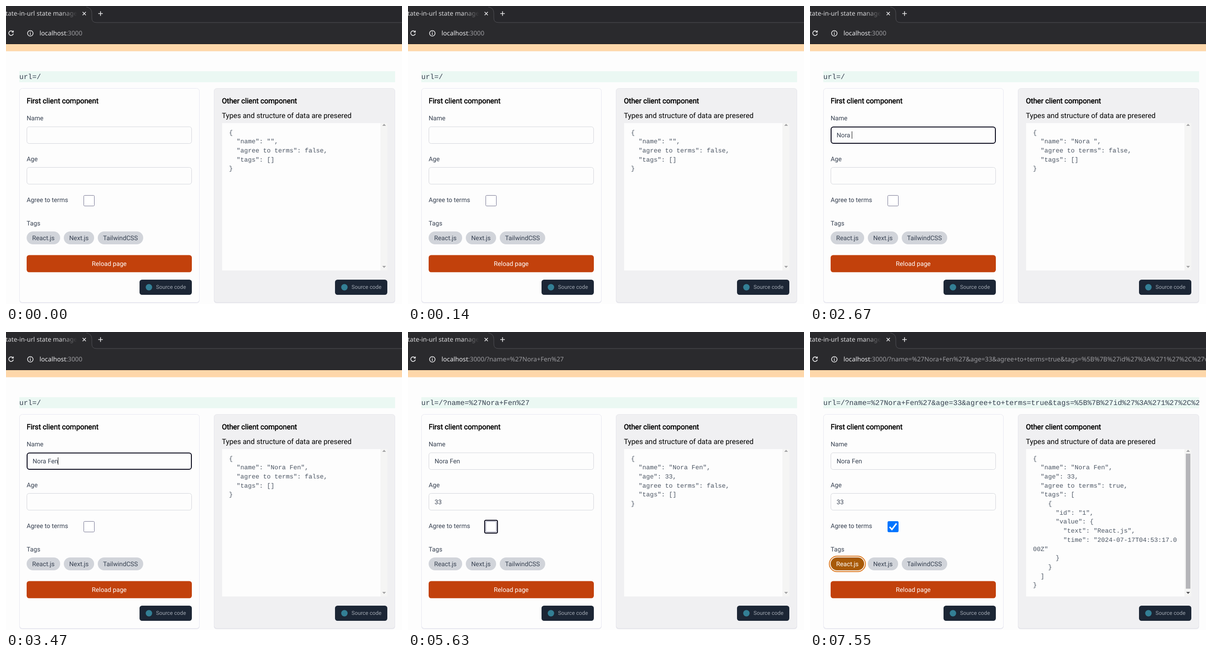
An HTML page for the animation above (8000 ms loop, 863 by 649 pixels).

```html
<!DOCTYPE html>
<html lang="en">
<head>
<meta charset="utf-8">
<style>
  html, body { margin: 0; width: 100%; height: 100%; overflow: hidden; background: #fdfdfd; }
  svg { display: block; width: 863px; height: 649px; }
  text { white-space: pre; font: 13.75px Roboto, sans-serif; fill: #374151; text-rendering: geometricPrecision; }
  .ui { font-family: "Noto Sans", sans-serif; fill: #9b9b9f; }
  .title { font-size: 15.72px; fill: #000; }
  .bold { stroke: #000; stroke-width: .55px; }
  .mono { font-family: "Liberation Mono", monospace; fill: #4b5563; }
  .url { font-size: 15.72px; fill: #374151; }
  .small { font-size: 11.79px; fill: #a0a7b1; }
  .mid { text-anchor: middle; }
  .icon { fill: none; stroke: #e6e6e8; stroke-width: 1.6; }
</style>
</head>
<body>
<svg viewBox="0 0 863 649">
  <defs>
    <linearGradient id="fade" gradientUnits="userSpaceOnUse" x1="120" x2="155">
      <stop stop-color="#d8d8da"/>
      <stop offset="1" stop-color="#d8d8da" stop-opacity="0"/>
    </linearGradient>
    <clipPath id="urlClip"><rect x="29" y="142" width="819" height="24"/></clipPath>
  </defs>

  <rect width="863" height="649" fill="#fdfdfd"/>
  <rect y="83" width="863" height="15.5" fill="#fed7aa"/>
  <rect x="29" y="142" width="819" height="24" fill="#ebf8f3"/>
  <text id="pageUrl" class="mono url" x="29" y="159" clip-path="url(#urlClip)"></text>

  <rect x="29" y="180" width="393" height="467" rx="6" fill="#e6e6ee"/>
  <rect x="29.5" y="179.5" width="392" height="466" rx="6" fill="#fdfdfd" stroke="#e8e8f1"/>
  <rect x="453" y="180" width="395" height="467" rx="6" fill="#e2e2e8"/>
  <rect x="453.5" y="179.5" width="394" height="466" rx="6" fill="#f0f0f2" stroke="#e6e6ec"/>

  <text class="title bold" x="45" y="212">First client component</text>
  <text class="title bold" x="470.5" y="212">Other client component</text>
  <text class="title" x="470.5" y="244">Types and structure of data are presered</text>

  <text x="45" y="249">Name</text>
  <text x="45" y="338">Age</text>
  <text x="45" y="427">Agree to terms</text>
  <text x="45" y="478">Tags</text>

  <rect id="nameBox" rx="5"/>
  <rect id="ageBox" rx="5"/>
  <text id="name" x="58" y="286"></text>
  <text id="age" x="58" y="375"></text>
  <rect id="caret" width="1" height="16" fill="#111"/>
  <g id="spinner">
    <rect x="378" y="360" width="14" height="20" fill="#efeff3"/>
    <path d="M381 368l4-4 4 4zM381 373h8l-4 4z" fill="#444450"/>
  </g>

  <rect id="check" x="169.5" y="412.5" width="23" height="23" rx="2"/>
  <path id="tick" d="M173.500 424.500l5 5.500 10-13" fill="none" stroke="#fff" stroke-width="3.200"/>
  <rect id="checkRing" x="167" y="410" width="28" height="28" rx="3" fill="none" stroke="#0a0a1c" stroke-width="2"/>

  <g id="tags"></g>

  <rect x="45" y="542.500" width="360" height="37.300" rx="5.500" fill="#c2410c"/>
  <text class="mid" x="225" y="566" style="fill:#fff">Reload page</text>
  <g id="sources"></g>

  <rect x="471" y="255" width="345" height="321" fill="#fdfdfd"/>
  <rect x="816" y="255" width="15" height="321" fill="#f5f5f4"/>
  <rect id="thumb" x="819" y="265" width="10" height="294" fill="#b5b5b9"/>
  <path d="M820 261l4-4.500 4 4.500z" fill="#a3a3a5"/>
  <path id="downArrow" d="M820 566h8l-4 4.500z"/>
  <g id="code"></g>

  <rect id="highlight" y="83" width="863" height="566" fill="rgb(111,168,220)" fill-opacity=".66"/>

  <rect width="863" height="83" fill="#2a2a2d"/>
  <path d="M172 0Q187 3 187 15V26Q187 36 197 36H863V0z" fill="#27272b"/>
  <path d="M175 2Q187 4 187 15V26Q187 36 197 36H863" fill="none" stroke="#515156"/>
  <rect y="82" width="863" height="1" fill="#18181a"/>
  <text class="ui" x="-7.500" y="21" style="fill:url(#fade)">state-in-url state manage</text>
  <path class="icon" d="M167 13l7 7m0-7l-7 7M201 16.500h10m-5-5v10"/>
  <path class="icon" d="M15 56A5 5 0 1 0 16 60M16 53.500V57H12.500"/>
  <circle class="icon" cx="53" cy="59.500" r="6"/>
  <path class="icon" d="M53 58.500v4.500M53 55.800v1.500"/>
  <text class="ui" x="73" y="64"><tspan fill="#ededef">localhost</tspan><tspan id="barUrl"></tspan></text>
</svg>

<script>
const LOOP = 8000;
const BLINK = 610;
const FULL_NAME = "Nora Fen";
const NAME_KEYS = [1730, 1920, 2160, 2530, 2670, 3090, 3380, 3470];
const AGE_KEYS = [5300, 5440];
const AT = {
  nameFocus: 840, ageFocus: 3750, ageCaret: 3800, nameUrl: 3850,
  checkFocus: 5630, ageUrl: 5770, hover: 6190, checked: 6610, checkUrl: 6800,
  tagged: 7310, tagUrl: 7500
};
const TAG = { id: "1", value: { text: "React.js", time: "2024-07-17T04:53:17.000Z" } };
const TAG_FILL = "#d1d4da";

const $ = id => document.getElementById(id);
const set = (id, attrs) => {
  for (const key in attrs) $(id).setAttribute(key, attrs[key]);
};
const show = (id, visible) => $(id).style.display = visible ? "" : "none";
const write = (id, text) => {
  if ($(id).textContent !== text) $(id).textContent = text;
};

$("tags").innerHTML =
  `<rect id="tagRing" x="42.2" y="488.2" width="78.6" height="33.6" rx="16.8" fill="#fdfdfd" stroke="#dd7a22" stroke-width="2"/>` +
  [["React.js", 45, 73], ["Next.js", 126, 66], ["TailwindCSS", 200, 99]].map(([label, x, w], i) =>
    `<rect id="tag${i}" x="${x}" y="491" width="${w}" height="28" rx="14" fill="${TAG_FILL}"/>
     <text id="label${i}" class="mid" x="${x + w / 2}" y="510">${label}</text>`).join("");

$("sources").innerHTML = [291, 717].map(x =>
  `<rect x="${x}" y="596" width="114" height="33" rx="5.5" fill="#1c2635"/>
   <circle cx="${x + 20.5}" cy="612.5" r="7" fill="#337f95"/>
   <text class="small" x="${x + 36}" y="616">Source code</text>`).join("");

const typed = (text, keys, t) => text.slice(0, keys.filter(k => k <= t).length);

function field(id, y, focused) {
  const edge = focused ? 1 : .5;
  set(id, {
    x: 45 + edge, y: y + edge, width: 360 - 2 * edge, height: 37.5 - 2 * edge,
    fill: "#fdfdfd", stroke: focused ? "#0a0a1c" : "#d4d6dc", "stroke-width": 2 * edge
  });
}

function query(t) {
  const parts = [];
  if (t >= AT.nameUrl) parts.push(`name=%27${FULL_NAME.replace(" ", "+")}%27`);
  if (t >= AT.ageUrl) parts.push("age=33");
  if (t >= AT.checkUrl) parts.push("agree+to+terms=true");
  if (t >= AT.tagUrl) {
    parts.push("tags=%5B%7B%27id%27%3A%271%27%2C%27value%27%3A%7B%27text%27%3A%27React.js%27");
  }
  return parts.length ? "/?" + parts.join("&") : "";
}

let shownCode;
function drawCode(state) {
  const json = JSON.stringify(state, null, 2);
  if (json === shownCode) return;
  shownCode = json;
  $("code").innerHTML = json.match(/.{1,38}/g).map((line, i) =>
    `<text class="mono" x="486" y="${279.5 + 19.7 * i}">${line}</text>`).join("");
}

function drawCaret(t) {
  const inName = t >= AT.nameFocus && t < AT.ageFocus;
  const inAge = t >= AT.ageCaret && t < AT.checkFocus;
  const starts = inName ? [AT.nameFocus, ...NAME_KEYS] : [AT.ageCaret, ...AGE_KEYS];
  const last = Math.max(...starts.filter(s => s <= t));
  const lit = (inName || inAge) && Math.floor((t - last) / BLINK) % 2 === 0;
  show("caret", lit);
  if (lit) {
    const width = $(inName ? "name" : "age").getComputedTextLength();
    set("caret", { x: Math.round(58 + width), y: inName ? 273 : 361 });
  }
}

function render(t) {
  const name = typed(FULL_NAME, NAME_KEYS, t);
  const age = typed("33", AGE_KEYS, t);
  const checked = t >= AT.checked;
  const tagged = t >= AT.tagged;
  const ageFocused = t >= AT.ageFocus && t < AT.checkFocus;

  show("highlight", t >= 50 && t < 140);
  field("nameBox", 262.5, t >= AT.nameFocus && t < AT.ageFocus);
  field("ageBox", 351, ageFocused);
  write("name", name);
  write("age", age);
  drawCaret(t);
  show("spinner", ageFocused || (t >= 6000 && t < 6140));

  const border = t >= AT.hover ? "#4f4f68" : "#767692";
  set("check", { fill: checked ? "#0075ff" : "#fff", stroke: checked ? "#0075ff" : border });
  show("tick", checked);
  show("checkRing", t >= AT.checkFocus && !tagged);

  show("tagRing", tagged);
  set("tag0", { fill: tagged ? "#a85a08" : TAG_FILL });
  $("label0").style.fill = tagged ? "#fff" : "";
  show("thumb", tagged);
  set("downArrow", { fill: tagged ? "#505054" : "#a3a3a5" });

  const path = query(t);
  write("barUrl", ":3000" + path);
  write("pageUrl", "url=" + (path || "/"));
  drawCode({
    name,
    age: age ? Number(age) : undefined,
    "agree to terms": checked,
    tags: tagged ? [TAG] : []
  });
}

const start = performance.now();
function tick() {
  render((performance.now() - start) % LOOP);
  requestAnimationFrame(tick);
}
tick();
</script>
</body>
</html>
```
